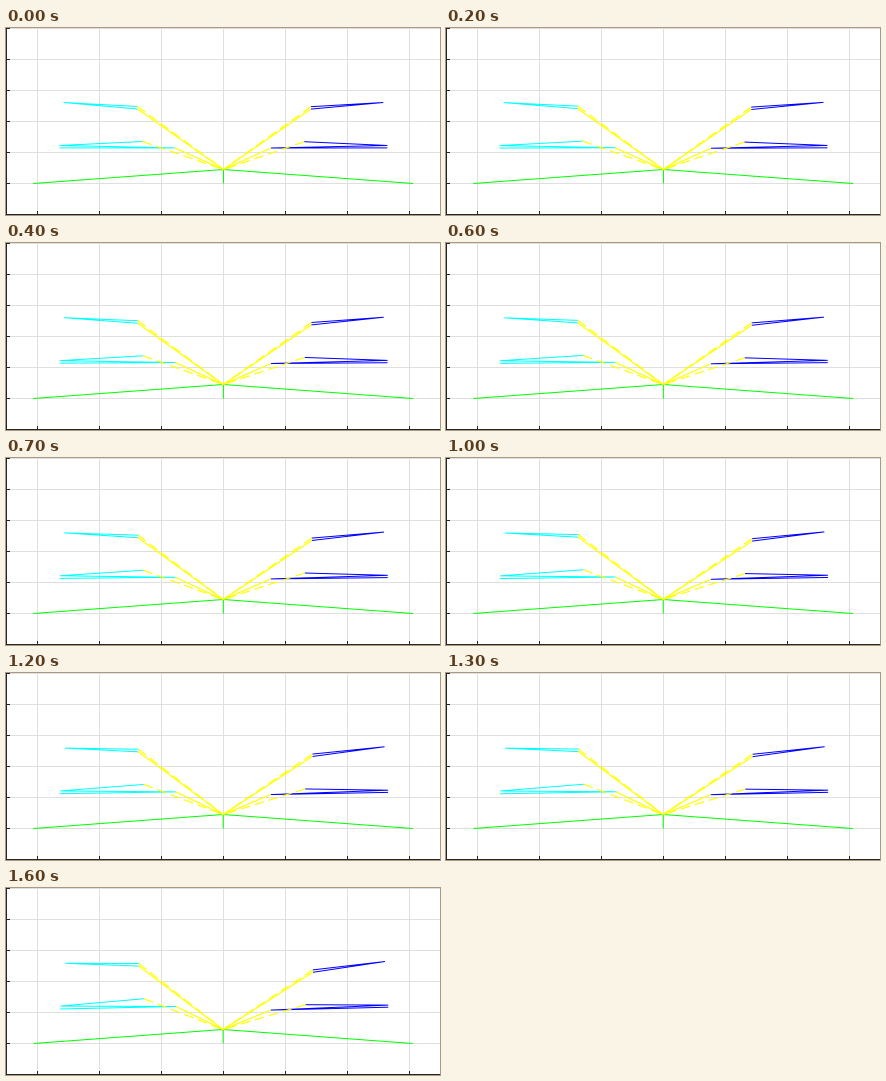
Animation, 434 px wide and 187 px high, one loop 1700 ms. Source, as a matplotlib script:

```python
import matplotlib.pyplot as plt
from matplotlib.animation import FuncAnimation

W, H, FRAMES = 434, 187, 17
PX = 0.72  # one pixel in points
GRID, AXIS = "#dfdfdf", "#262626"
GREEN, CYAN, BLUE, YELLOW = "#00ff00", "#00ffff", "#0000ff", "#ffff00"
DASH = (0, (8, 4))

fig = plt.figure(figsize=(W / 100, H / 100), dpi=100, facecolor="white")
ax = fig.add_axes([0, 0, 1, 1])
ax.set_xlim(0, W)
ax.set_ylim(H, 0)
ax.axis("off")


def line(color, points, width=1, **style):
    """Draw through pixel centres, without snapping to the pixel grid."""
    xs, ys = zip(*((x + 0.5, y + 0.5) for x, y in points))
    return ax.plot(xs, ys, color=color, lw=width * PX, snap=False,
                   solid_capstyle="butt", dash_capstyle="butt",
                   solid_joinstyle="bevel", **style)[0]


# grid, axes and ticks
xticks = range(31, W, 62)
yticks = range(0, H, 31)
for x in xticks:
    line(GRID, [(x, -1), (x, H)])
for y in yticks:
    line(GRID, [(-1, y), (W, y)])
line(AXIS, [(0, -1), (0, H)])
line(AXIS, [(-1, H - 1), (W, H - 1)])
for x in xticks:
    line(AXIS, [(x, H - 4.5), (x, H)])
for y in yticks:
    line(AXIS, [(-0.5, y), (3.5, y)])

# each joint: position at the start, position at the end
JOINTS = {
    "hub": ((217, 141), (216.5, 141)),
    "foot": ((217, 155), (216.7, 155)),
    "left": ((26.7, 155), (27, 155)),
    "right": ((406.7, 155), (406.2, 155)),
    "lu_tip": ((57, 74), (58.8, 74.8)),
    "lu_a": ((131, 78), (132.3, 75)),
    "lu_b": ((131, 80.5), (132.3, 77.6)),
    "ll_tip": ((53, 117), (54, 117.6)),
    "ll_low": ((53, 119.4), (53.6, 120.5)),
    "ll_a": ((136, 113), (137.6, 110.2)),
    "ll_b": ((168.3, 119.4), (169.6, 118)),
    "ru_tip": ((376.8, 74), (378.5, 73)),
    "ru_a": ((304.4, 78.2), (306.3, 81.4)),
    "ru_b": ((304.4, 80.6), (306.3, 83.8)),
    "rl_tip": ((380.8, 117), (381.8, 116.6)),
    "rl_low": ((380.8, 119.4), (381.8, 118.7)),
    "rl_a": ((297.7, 113.2), (299, 116.2)),
    "rl_b": ((264.5, 119.5), (264.2, 121.6)),
}

links = []


def link(color, *names, **style):
    start = [JOINTS[name][0] for name in names]
    links.append((line(color, start, **style), names))


link(GREEN, "left", "hub", "right")
link(GREEN, "hub", "foot")
for side, color in (("l", CYAN), ("r", BLUE)):
    link(color, side + "u_a", side + "u_tip", side + "u_b")
    link(color, side + "l_a", side + "l_tip", side + "l_b", side + "l_low")
    for wing in ("u", "l"):
        link(YELLOW, "hub", side + wing + "_b", width=1.2)
        link(YELLOW, side + wing + "_a", "hub", width=1.2, linestyle=DASH)


def update(n):
    t = n / (FRAMES - 1)
    pos = {name: (a[0] + (b[0] - a[0]) * t + 0.5, a[1] + (b[1] - a[1]) * t + 0.5)
           for name, (a, b) in JOINTS.items()}
    for artist, names in links:
        artist.set_data(*zip(*(pos[name] for name in names)))
    return [artist for artist, _ in links]


anim = FuncAnimation(fig, update, frames=FRAMES, interval=100,
                     repeat=True, repeat_delay=0, blit=False)
plt.show()
```
